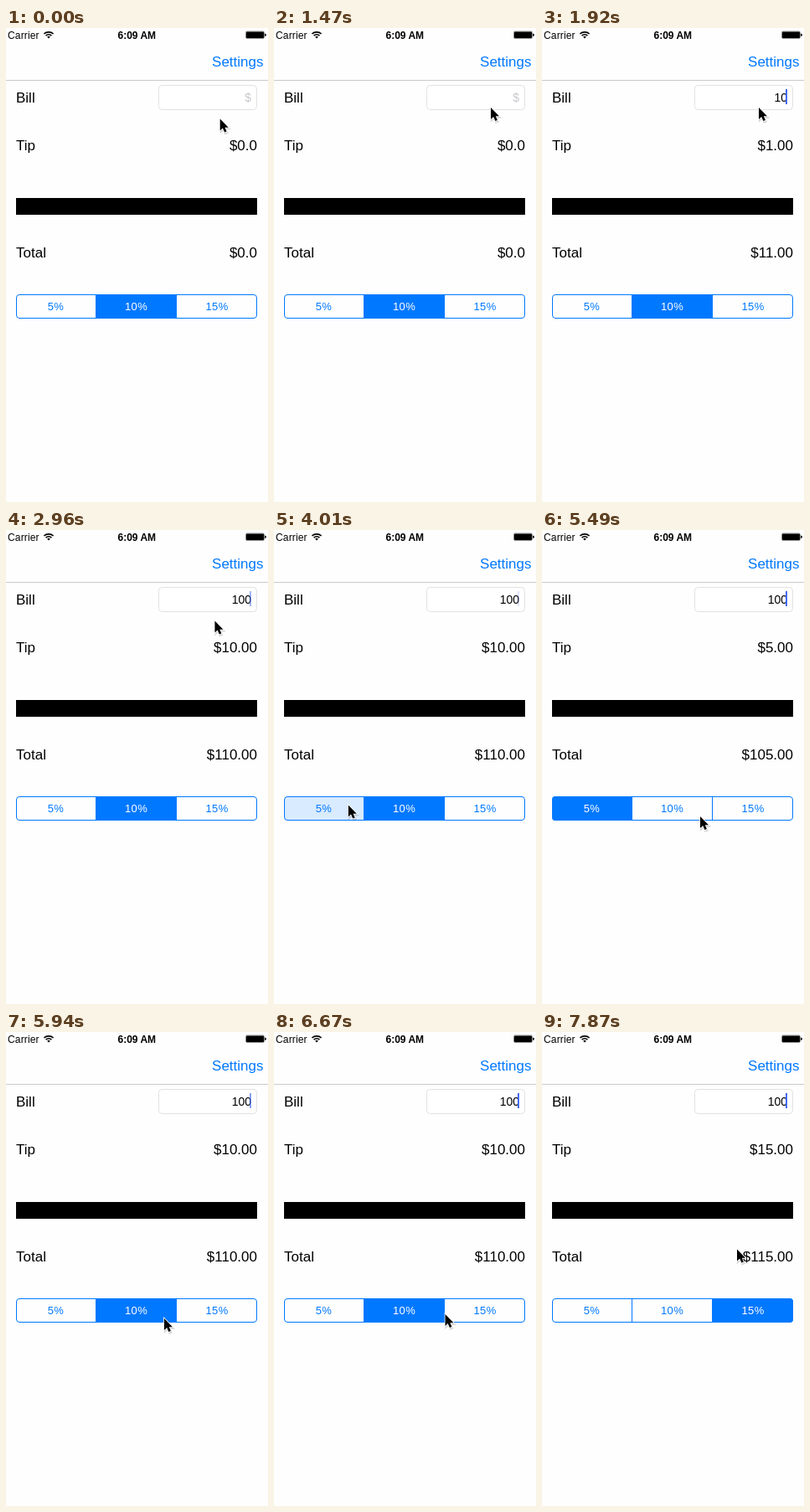
An HTML page for the animation above (8000 ms loop, 313 by 566 pixels).

```html
<!DOCTYPE html>
<html lang="en">
<head>
<meta charset="utf-8">
<title>Tip calculator</title>
<style>
  html, body { margin: 0; width: 100%; height: 100%; overflow: hidden; background: #fefefe; }
  svg { display: block; font: 17px "Liberation Sans", Arial, sans-serif; }
  .end { text-anchor: end; }
  .mid { text-anchor: middle; }
  .status { font-size: 12px; }
  .field { font-size: 14px; }
  .seg { font-size: 13px; letter-spacing: .4px; }
</style>
</head>
<body>
<svg width="313" height="566" viewBox="0 0 313 566">
  <defs>
    <clipPath id="pill"><rect x="12" y="318" width="288" height="29" rx="4"/></clipPath>
  </defs>

  <g class="status">
    <text x="2" y="12.5" letter-spacing=".15">Carrier</text>
    <text x="156.3" y="12.5" class="mid" font-weight="bold">6:09 AM</text>
  </g>
  <g fill="none" stroke="#000" stroke-width="1.7">
    <path d="M45.4 7A8.2 8.2 0 0 1 56.6 7M47.6 9.2A5 5 0 0 1 54.4 9.2"/>
    <path d="M51 12.6L49.2 10.7A2.6 2.6 0 0 1 52.8 10.7Z" fill="#000" stroke="none"/>
  </g>
  <rect x="286.5" y="4" width="22" height="8.5" rx="1.5" fill="none" stroke="#777" stroke-width=".8"/>
  <rect x="287" y="4.5" width="21" height="7.5" rx=".8"/>
  <path d="M309.2 6.6a1.7 1.7 0 0 1 0 3.4z"/>

  <text x="307.5" y="46" class="end" fill="#0078ff">Settings</text>
  <rect y="62" width="313" height="1" fill="#cacaca"/>

  <text x="12" y="88.5">Bill</text>
  <text x="12" y="145.5">Tip</text>
  <text x="12" y="273.5">Total</text>
  <rect x="182.5" y="68.5" width="117" height="29" rx="4" fill="#fff" stroke="#e1e1e1"/>
  <text id="bill" x="293" y="88" class="end field"></text>
  <rect id="caret" x="291" y="73" width="2" height="18" fill="#426bf2"/>
  <text id="tip" x="300" y="145.5" class="end"></text>
  <text id="total" x="300" y="273.5" class="end"></text>
  <rect x="12" y="203" width="288" height="20"/>

  <g id="segs" clip-path="url(#pill)"></g>
  <path d="M107.5 318V347M203.5 318V347" stroke="#0078ff"/>
  <rect x="12.5" y="318.5" width="287" height="28" rx="3.5" fill="none" stroke="#0078ff"/>
  <g id="labels" class="mid seg"></g>

  <g id="cursor">
    <path d="M0 0V14L3.2 11 5.4 16 7.9 15 5.8 10.2H10Z" transform="translate(.8 1.6)"
          fill="#000" stroke="#000" stroke-width="2" opacity=".15"/>
    <path d="M0 0V14L3.2 11 5.4 16 7.9 15 5.8 10.2H10Z" stroke="#fff" stroke-width="1.6" paint-order="stroke"/>
  </g>
</svg>
<script>
const LOOP = 8000, BLUE = "#0078ff";
const $ = id => document.getElementById(id);
const rates = [5, 10, 15], edges = [12, 107, 203, 300];

// [start, end, x, y]: the pointer glides to x, y
const glides = [
  [0, 0, 255.7, 108.5], [100, 580, 259, 95], [2860, 3560, 90, 335.5],
  [3740, 3860, 88.8, 328.5], [4400, 5040, 189, 342], [6040, 6500, 204.5, 337],
  [7150, 7800, 233, 259.5]
];
const typed = [[0, ""], [1770, "1"], [1920, "10"], [2360, "100"]];
const picks = [[0, 1], [4160, 0], [5930, 1], [6840, 2]];
const presses = [[3850, 4160, 0], [5780, 5930, 1], [6680, 6840, 2]];
const blinkStarts = [[0, 0], [770, 770], [1770, 1770], [1920, 1920], [2360, 2360]];

const latest = (list, t) => list.filter(e => e[0] <= t).pop()[1];
const clamp = v => Math.min(1, Math.max(0, v));
const ease = v => v * v * (3 - 2 * v);

function svgAdd(parent, tag, attrs, text = "") {
  const el = document.createElementNS("http://www.w3.org/2000/svg", tag);
  for (const k in attrs) el.setAttribute(k, attrs[k]);
  el.textContent = text;
  return $(parent).appendChild(el);
}

const segs = rates.map((r, i) => ({
  box: svgAdd("segs", "rect", { x: edges[i], y: 318, width: edges[i + 1] - edges[i] + (i == 1), height: 29 }),
  label: svgAdd("labels", "text", { x: [59.5, 155.6, 252][i], y: 337 }, r + "%")
}));

function pointer(t) {
  let [, , x, y] = glides[0];
  for (const [a, b, gx, gy] of glides.slice(1)) {
    const k = ease(clamp((t - a) / (b - a)));
    x += (gx - x) * k;
    y += (gy - y) * k;
  }
  return [x, y];
}

function caretAlpha(t) {
  if (t < 870) return 0;
  const p = (t - latest(blinkStarts, t)) % 1000;
  return p < 750 ? 1 - clamp((p - 520) / 160) : clamp((p - 780) / 170);
}

function draw(t) {
  const text = latest(typed, t), pick = latest(picks, t);
  const bill = +text, tip = bill * rates[pick] / 100;
  const money = v => "$" + (text ? v.toFixed(2) : "0.0");
  $("bill").textContent = text || "$";
  $("bill").setAttribute("fill", text ? "#000" : "#c7c7cd");
  $("tip").textContent = money(tip);
  $("total").textContent = money(bill + tip);
  $("caret").setAttribute("opacity", caretAlpha(t));

  const press = presses.find(([a, b]) => t >= a && t < b);
  segs.forEach(({ box, label }, i) => {
    const on = i == pick, held = press && press[2] == i;
    box.setAttribute("fill", on ? BLUE : held ? "#d9ebff" : "#fefefe");
    label.setAttribute("fill", on ? "#fff" : BLUE);
  });
  $("cursor").setAttribute("transform", `translate(${pointer(t)})`);
}

const begin = performance.now();
function tick() {
  draw((performance.now() - begin) % LOOP);
  requestAnimationFrame(tick);
}
tick();
</script>
</body>
</html>
```
